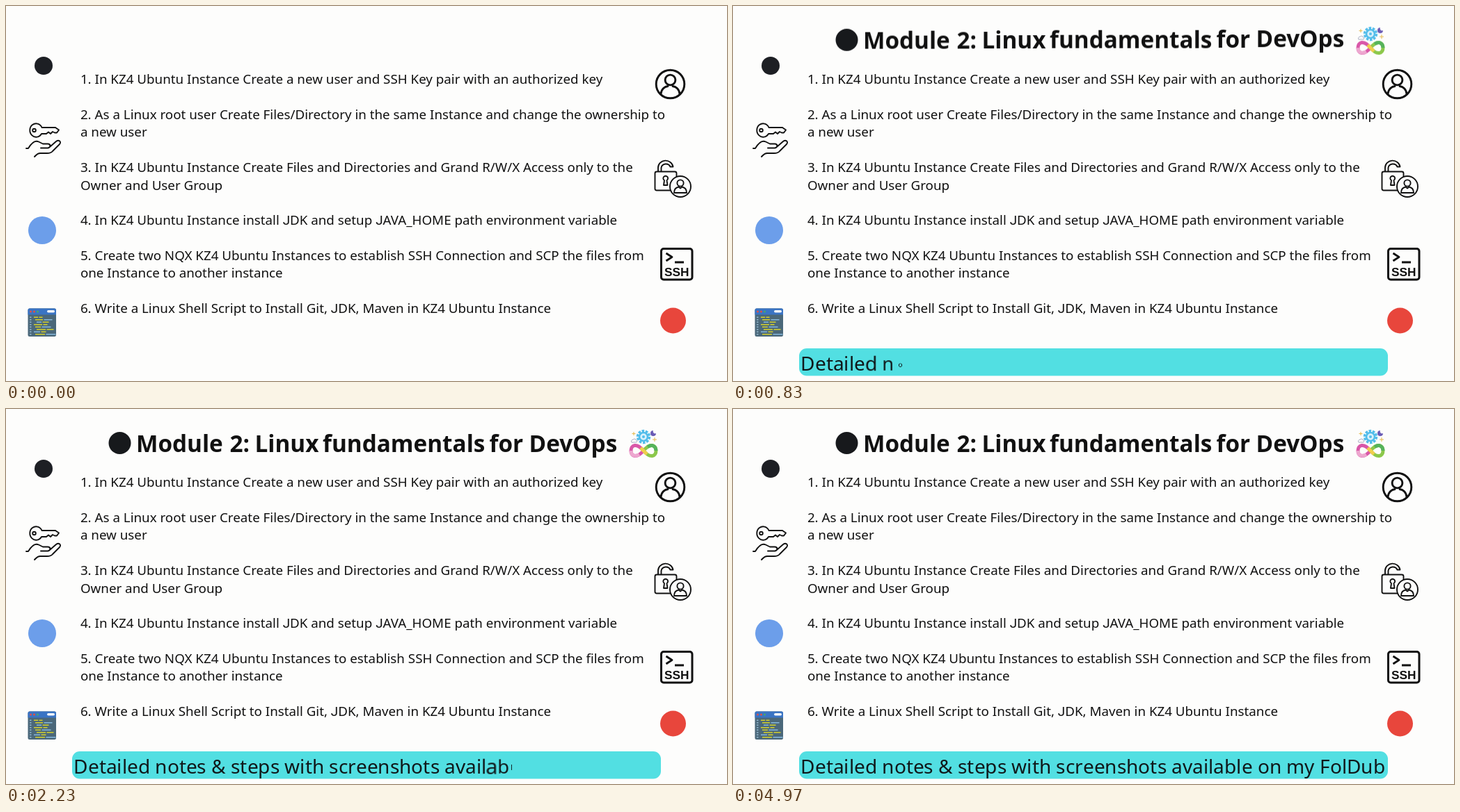
An HTML page for the animation above (5010 ms loop, 1036 by 540 pixels).

```html
<!DOCTYPE html>
<html lang="en">
<head>
<meta charset="utf-8">
<title>Module 2: Linux fundamentals</title>
<style>
  html, body { margin: 0; width: 100%; height: 100%; overflow: hidden; background: #fdfdfc; }
  svg { position: absolute; left: 0; top: 0; }
  text, #typed { font-family: "Noto Sans", "Open Sans", sans-serif; fill: #111; color: #10181a; }
  .body { font-size: 18.78px; }
  .short-j { font-family: Roboto, sans-serif; }
  .title { font-size: 33.3px; font-weight: 700; fill: #060606; }
  .line { fill: none; stroke: #111; stroke-linecap: round; stroke-linejoin: round; }
  #typed { position: absolute; left: 97.3px; top: 493.5px; font-size: 28.03px; line-height: 40px; white-space: pre; }
  #typed span { display: inline-block; transform-origin: 50% 23px; }
</style>
</head>
<body>
<svg id="stage" width="1036" height="540" viewBox="0 0 1036 540">
  <rect id="banner" x="95" y="493" width="846" height="39.5" rx="11" fill="#52dfe2"/>

  <g id="lines" class="body"></g>
  <g id="title" class="title"></g>

  <!-- plain marks -->
  <circle id="mascot" cx="163.5" cy="49" r="16" fill="#17191c"/>
  <circle cx="54" cy="86" r="13" fill="#1d1f24"/>
  <circle cx="52" cy="323" r="20" fill="#6c9eea"/>
  <circle cx="958.5" cy="453" r="18.5" fill="#e8463c"/>

  <!-- gear over an endless loop -->
  <g id="loop">
    <circle cx="916" cy="40" r="8.5" fill="none" stroke="#52bdea" stroke-width="3.4" stroke-dasharray="3.6 1.74"/>
    <circle cx="916" cy="40" r="6" fill="#d9f1fb" stroke="#52bdea" stroke-width="2.6"/>
    <circle cx="916" cy="40" r="2" fill="#52bdea"/>
    <path d="M899 48a2.5 2.5 0 0 1 2-4a3 3 0 0 1 5 1.5a1.5 1.5 0 0 1 0 2.5z" fill="none" stroke="#9aa0b8" stroke-width=".9"/>
    <path d="M930 31a4 4 0 1 0 4 4a3 3 0 0 1-4-4z" fill="#6a5bb5"/>
    <path d="M902 33v5M899.5 35.5h5M929 44h6M932 41v6" stroke="#e5b84b" stroke-width="1"/>
    <g fill="none" stroke-width="5">
      <path d="M916 60C926 48 934 52 934 60S926 72 916 60" stroke="#8cc84b"/>
      <path d="M922 54.5C929 50 934 54 934 60" stroke="#56b35b"/>
      <path d="M916 60C906 48 898 52 898 60S906 72 916 60" stroke="#d957a8"/>
      <path d="M898 60C898 67 904 69 910 65.5" stroke="#eda7cf"/>
      <path d="M912 56L921 65" stroke="#f0cf4d"/>
    </g>
  </g>

  <!-- user -->
  <g class="line" stroke-width="2.9">
    <circle cx="954.5" cy="112.5" r="20.3"/>
    <circle cx="954.5" cy="106.5" r="7.4"/>
    <path d="M941 126.5C942 119 947 116 951 115.5M968 126.5C967 119 962 116 958 115.5"/>
  </g>

  <!-- key above a hand -->
  <g class="line" stroke-width="1.9">
    <path d="M51.5 175H71L76 178.5L73 182.5H70L67 181L64 184L61 181.5L58 184H51A9 9.7 0 1 1 51.5 175Z"/>
    <circle cx="40.5" cy="179" r="2.3"/>
    <path d="M29 205H32C37 196.500 42 193 47 195.500L53 198.500H60C64.500 198.500 64.500 204 60 204.500H50M64 202L72 195C76 192 80 195.500 77 199L67 209C65 211.500 63 212 59 212H49C45 212 44 214 41 217"/>
  </g>

  <!-- open lock with a user badge -->
  <g class="line" stroke-width="1.9">
    <rect x="932.5" y="238.5" width="31" height="27" rx="2.5"/>
    <path d="M937 238V233A10.8 10.3 0 0 1 958.5 231.5H954.5A6.8 6.5 0 0 0 941.5 233V238"/>
    <path d="M946 251A3.4 3.4 0 1 1 949.5 251L950.5 258H945Z"/>
    <circle cx="969" cy="260" r="15" fill="#fdfdfc"/>
    <circle cx="969" cy="255" r="4.6"/>
    <path d="M960 269C960 263 964 261 966.5 260.5L969 262.5L971.5 260.5C974 261 978 263 978 269Z"/>
  </g>

  <!-- terminal -->
  <g class="line">
    <rect x="941.5" y="349.5" width="44.5" height="44.5" rx="3.5" stroke-width="3"/>
    <path d="M948.5 356L957 361.5L948.5 367M961 369H974" stroke-width="2.8" stroke-linecap="butt"/>
  </g>
  <text x="963.8" y="388.500" text-anchor="middle" style="font:bold 17.3px 'Liberation Sans',sans-serif">SSH</text>

  <!-- code window -->
  <g id="code">
    <rect x="31.5" y="435.5" width="40.5" height="40.5" rx="2.5" fill="#4b687a"/>
    <path d="M31.5 444.5V438a2.5 2.5 0 0 1 2.5-2.5H69.5a2.5 2.5 0 0 1 2.5 2.5V444.5Z" fill="#3a74c4"/>
    <circle cx="35.5" cy="440" r="1.5" fill="#d9534f"/>
    <circle cx="40.5" cy="440" r="1.5" fill="#e25141"/>
    <circle cx="45.5" cy="440" r="1.5" fill="#49a86c"/>
    <rect x="59" y="438" width="11" height="3.6" rx="1.8" fill="#f2f6fa"/>
  </g>
</svg>
<div id="typed"></div>

<script>
const LOOP = 5010;
const EXPO_OUT = 'cubic-bezier(.16,1,.3,1)';
const BACK_OUT = 'cubic-bezier(.34,1.56,.64,1)';
const $ = id => document.getElementById(id);

function svg(parent, tag, attrs, content = '') {
  const el = document.createElementNS('http://www.w3.org/2000/svg', tag);
  for (const key in attrs) el.setAttribute(key, attrs[key]);
  el.innerHTML = content;
  return parent.appendChild(el);
}

// Moves one property from a to b once in every loop, holding it before and after.
function tween(el, prop, a, b, start, duration, easing = 'linear') {
  el.animate([
    { offset: 0, [prop]: a },
    { offset: start / LOOP, [prop]: a, easing },
    { offset: (start + duration) / LOOP, [prop]: b },
    { offset: 1, [prop]: b }
  ], { duration: LOOP, iterations: Infinity });
}

function slideIn(el, dy, start, duration, fade) {
  tween(el, 'transform', `translateY(${dy}px)`, 'translateY(0px)', start, duration, EXPO_OUT);
  tween(el, 'opacity', 0, 1, start, fade);
}

const lines = [
  '1. In KZ4 Ubuntu Instance Create a new user and SSH Key pair with an authorized key', '',
  '2. As a Linux root user Create Files/Directory in the same Instance and change the ownership to',
  'a new user', '',
  '3. In KZ4 Ubuntu Instance Create Files and Directories and Grand R/W/X Access only to the',
  'Owner and User Group', '',
  '4. In KZ4 Ubuntu Instance install JDK and setup JAVA_HOME path environment variable', '',
  '5. Create two NQX KZ4 Ubuntu Instances to establish SSH Connection and SCP the files from',
  'one Instance to another instance', '',
  '6. Write a Linux Shell Script to Install Git, JDK, Maven in KZ4 Ubuntu Instance'
];
// The J stands on the baseline, so it comes from a face without a descending J.
const withShortJ = line => line.replace(/J/g, '<tspan class="short-j">J</tspan>');
lines.forEach((line, i) => svg($('lines'), 'text', { x: 106.9, y: 112.4 + 25.35 * i }, withShortJ(line)));

// Code rows: a gutter mark, then two dashes of varying length.
for (let row = 0; row < 8; row++) {
  const y = 447.5 + row * 3.5;
  const indent = 40 + (row % 3) * 2;
  const split = indent + 6 + (row * 5) % 9;
  const dash = (x, width, fill) => svg($('code'), 'rect', { x, y, width, height: 1.5, fill });
  dash(34, 2.5, '#8fb3c9');
  dash(indent, split - indent, row % 4 === 2 ? '#86b8dc' : '#d3cf2c');
  dash(split + 1.5, 5 + (row * 7) % 10, row % 3 === 1 ? '#86b8dc' : '#d3cf2c');
}

// Title words drop in one after another, led by the mascot.
const words = [['Module', 187], ['2:', 321.5], ['Linux', 357.5], ['fundamentals', 455], ['for', 694.5], ['DevOps', 751.5]];
const dropIn = (el, order) => slideIn(el, -22, 65 + 67 * order, 1250, 60);
dropIn($('mascot'), 0);
words.forEach(([word, x], i) => dropIn(svg($('title'), 'text', { x, y: 62 }, word), i + 1));

slideIn($('loop'), 42, 340, 700, 100);
slideIn($('banner'), 6, 60, 400, 220);

// Banner letters pop up one by one.
[...'Detailed notes & steps with screenshots available on my FolDub'].forEach((char, i) => {
  const letter = document.createElement('span');
  letter.textContent = char;
  $('typed').append(letter);
  tween(letter, 'transform', 'scale(0)', 'scale(1)', 440 + 37.8 * i, 150, BACK_OUT);
});
</script>
</body>
</html>
```
